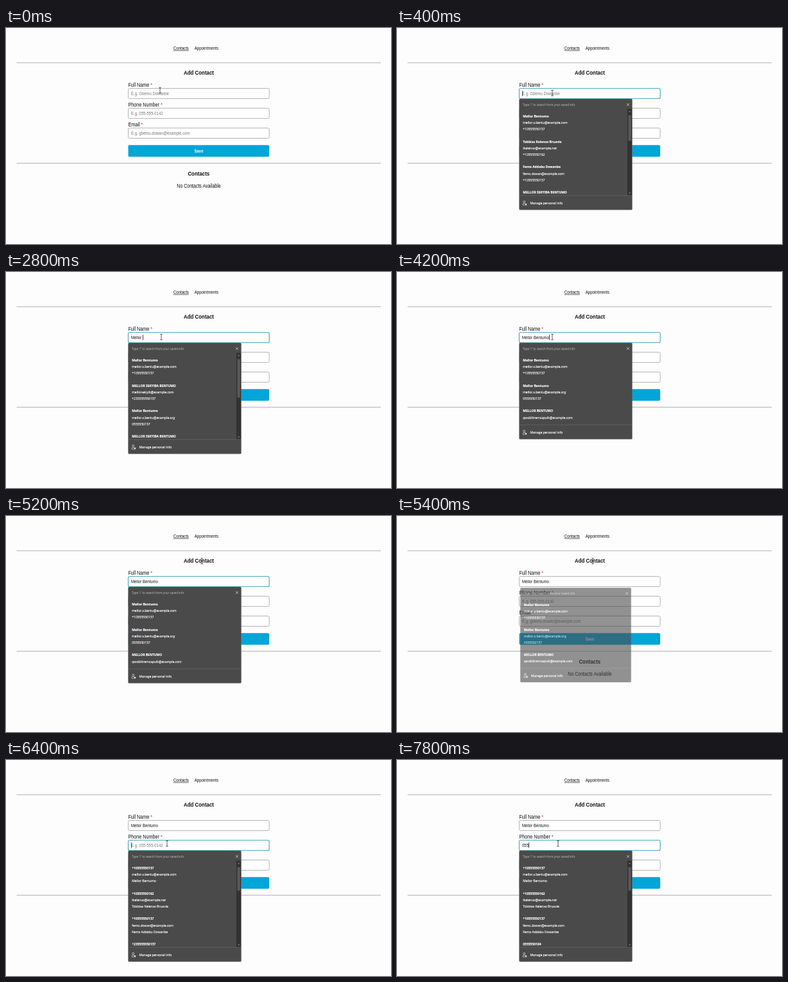
These frames come from a looping animation (600x338 px, 8 s). An HTML page:

```html
<!DOCTYPE html>
<html lang="en">
<head>
<meta charset="utf-8">
<title>Add Contact</title>
<style>
  html, body { margin: 0; height: 100%; overflow: hidden; background: #fdfdfd; }
  svg { display: block; width: 100vw; height: 100vh; }
  text { white-space: pre; font-family: "Liberation Sans", Arial, sans-serif; fill: #111; }
  .ui { font-family: "Open Sans", "Noto Sans", sans-serif; }
  .white { fill: #fff; stroke: #fff; stroke-width: .16px; }
  .bold { font-weight: 700; }
</style>
</head>
<body>
<svg id="stage" viewBox="0 0 600 338" preserveAspectRatio="none"></svg>
<script>
const STEP = 200, LOOP = 8000;
const ASPECT = 0.85;
const stage = document.getElementById('stage');
const pen = document.createElement('canvas').getContext('2d');

const NAME = 'Mellor Bentumo', PHONE = '055';
const mail = 'mellor.s.bentu@example.com', tel = '+10555550137';
const tobbias = ['Tobbias Kelenso Bruavie', 'tkelenso@example.net', '+10555550162'];
const femo = ['Femo Addabu Dowanbe', 'femo.dowan@example.com', tel];
const longName = 'MELLOR SEKYIBA BENTUMO';
const mellor = [NAME, mail, tel];
const mellorLocal = [NAME, 'mellor.s.bentu@example.org', '0555550137'];
const byPhone = ([name, email, phone]) => [phone, email, name];

const nameLists = {
  all: [mellor, tobbias, femo, [longName]],
  first: [mellor, [longName, 'mellorsekyib@example.com', '+233555550137'], mellorLocal, [longName]],
  full: [mellor, mellorLocal, ['MELLOR BENTUMO', 'qwoblitremzapulk@example.com']]
};
const phoneList = last => [...[mellor, tobbias, femo].map(byPhone), [last]];

// Keyframes are [step, value]; each value holds until the next.
const nameLength = [[0, 0], [7, 1], [10, 3], [11, 4], [12, 5], [14, 7], [17, 8], [18, 9], [19, 11], [20, 12], [21, 14]];
const phoneLength = [[0, 0], [37, 1], [38, 2], [39, 3]];
const pointer = [[0, [240, 97.5]], [1, [242, 101.7]], [25, [285, 80]], [26, [305, 70.5]],
                 [28, [285, 95]], [29, [257, 127]], [30, [251, 130.7]]];
const valueAt = (keys, step) => keys.filter(([start]) => start <= step).pop()[1];

const rect = (x, y, w, h, attrs) => `<rect x="${x}" y="${y}" width="${w}" height="${h}" ${attrs}/>`;
const path = (d, color, width = 1) => `<path d="${d}" fill="none" stroke="${color}" stroke-width="${width}"/>`;
const text = (str, x, y, size, attrs = '') =>
  `<text transform="translate(${x} ${y}) scale(${ASPECT} 1)" font-size="${size}" ${attrs}>${str}</text>`;
const centered = 'text-anchor="middle" class="bold"';

function textWidth(str, size) {
  pen.font = '100px "Liberation Sans", Arial, sans-serif';
  return pen.measureText(str).width * size / 100 * ASPECT;
}

function field(label, y, hint, value, focused, caret) {
  const caretX = 195.5 + textWidth(value, 7.05);
  return text(`${label} <tspan style="fill:#e0353f">*</tspan>`, 190.4, y - 2.2, 8.5) +
    rect(190.5, y + .5, 219.7, 16, `rx="2" fill="#fff" stroke="${focused ? '#4fa9c6' : '#adadad'}" stroke-width="${focused ? 1.2 : .9}"`) +
    text(value || hint, 195, y + 10.6, 7.05, value ? '' : 'style="fill:#777"') +
    (caret ? path(`M${caretX} ${y + 4.3}v8.2`, '#111', .8) : '');
}

function popup(top, entries, thumb) {
  const height = thumb ? 173.6 : 150.6;
  const foot = top + height - 22.5;
  const rows = entries.map((lines, i) => lines.map((line, j) =>
    text(line, 196.2, top + 28.9 + i * 39.7 + j * 10.2, 5.88,
      `class="ui white ${j ? '' : 'bold'}"`)).join('')).join('');
  const scrollbar = !thumb ? '' :
    rect(359, top + 15.5, 7, foot - top - 15.5, 'fill="#323232"') +
    rect(360.5, top + 25.5, 4.4, thumb, 'fill="#595959"') +
    `<path d="M361.2 ${top + 20.5}l1.5-2 1.5 2zM361.2 ${foot - 4.5}l1.5 2 1.5-2z" fill="#8a8a8a"/>`;
  return rect(190.5, top, 176, height, 'rx="1.5" fill="#4a4a4a" stroke="#686868" stroke-width=".5"') +
    text("Type '/' to search from your saved info", 196, top + 11, 5.4, 'class="ui" style="fill:#c4c4c4"') +
    path(`M358 ${top + 6.9}l4 4m0-4l-4 4`, '#ddd', .7) +
    rows + scrollbar +
    path(`M191 ${foot}h175`, '#646464', .8) +
    `<circle cx="198.2" cy="${foot + 9.8}" r="1.5" fill="none" stroke="#ddd" stroke-width=".7"/>` +
    path(`M196.2 ${foot + 15}v-1.6q.3-1.2 1.8-1.2h1.6M196.2 ${foot + 15}h3`, '#ddd', .7) +
    rect(199.6, foot + 12.6, 2.5, 2.7, 'fill="#ddd"') +
    text('Manage personal info', 207.6, foot + 13.8, 5.88, 'class="ui white"');
}

function popupAt(step) {
  if (step >= 32) return popup(142, phoneList(step < 38 ? '+233555550137' : '0555550184'), 37);
  if (step < 2 || step > 27) return '';
  if (step < 8) return popup(111, nameLists.all, 40);
  if (step < 18) return popup(111, nameLists.first, 60);
  const list = popup(111, nameLists.full, 0);
  return step < 27 ? list :
    `<g opacity=".6" transform="translate(278.5 186.5) scale(.98) translate(-278.5 -186.5)">${list}</g>`;
}

function scene(step) {
  const onName = step >= 1 && step < 27, onPhone = step >= 31;
  const nameCaret = onName && step < 24 && !(step >= 4 && step < 7);
  const phoneCaret = onPhone && !(step >= 34 && step < 37);
  const name = NAME.slice(0, valueAt(nameLength, step));
  const phone = PHONE.slice(0, valueAt(phoneLength, step));
  const [x, y] = valueAt(pointer, step);
  return rect(0, 0, 600, 338, 'fill="#fdfdfd"') +
    text('Contacts', 260.8, 34.2, 7.2) + path('M260.8 35.3h24', '#222', .7) +
    text('Appointments', 293.7, 34.2, 7.2) +
    path('M16.5 54.4H584M16.5 211.5H584', '#b2b2b2') +
    text('Add Contact', 300.5, 73.2, 9.3, centered) +
    field('Full Name', 94, 'E.g. Gbemu Dowanbe', name, onName, nameCaret) +
    field('Phone Number', 125, 'E.g. 055-555-0142', phone, onPhone, phoneCaret) +
    field('Email', 156, 'E.g. gbemu.dowan@example.com', '', false, false) +
    rect(190.5, 183.2, 219.7, 18.2, 'rx="2" fill="#02a5d8"') +
    text('Save', 300.5, 195, 7.05, centered + ' style="fill:#fff"') +
    text('Contacts', 300.3, 230.7, 9.3, centered) +
    text('No Contacts Available', 300.5, 249.6, 8.25, 'text-anchor="middle"') +
    popupAt(step) +
    path(`M${x - 1.8} ${y - 4.3}h3.6M${x} ${y - 4.3}v8.6M${x - 1.8} ${y + 4.3}h3.6`, '#333', .8);
}

let drawn = -1;
function draw() {
  const step = Math.floor(performance.now() % LOOP / STEP);
  if (step !== drawn) stage.innerHTML = scene(drawn = step);
  requestAnimationFrame(draw);
}
draw();
</script>
</body>
</html>
```
